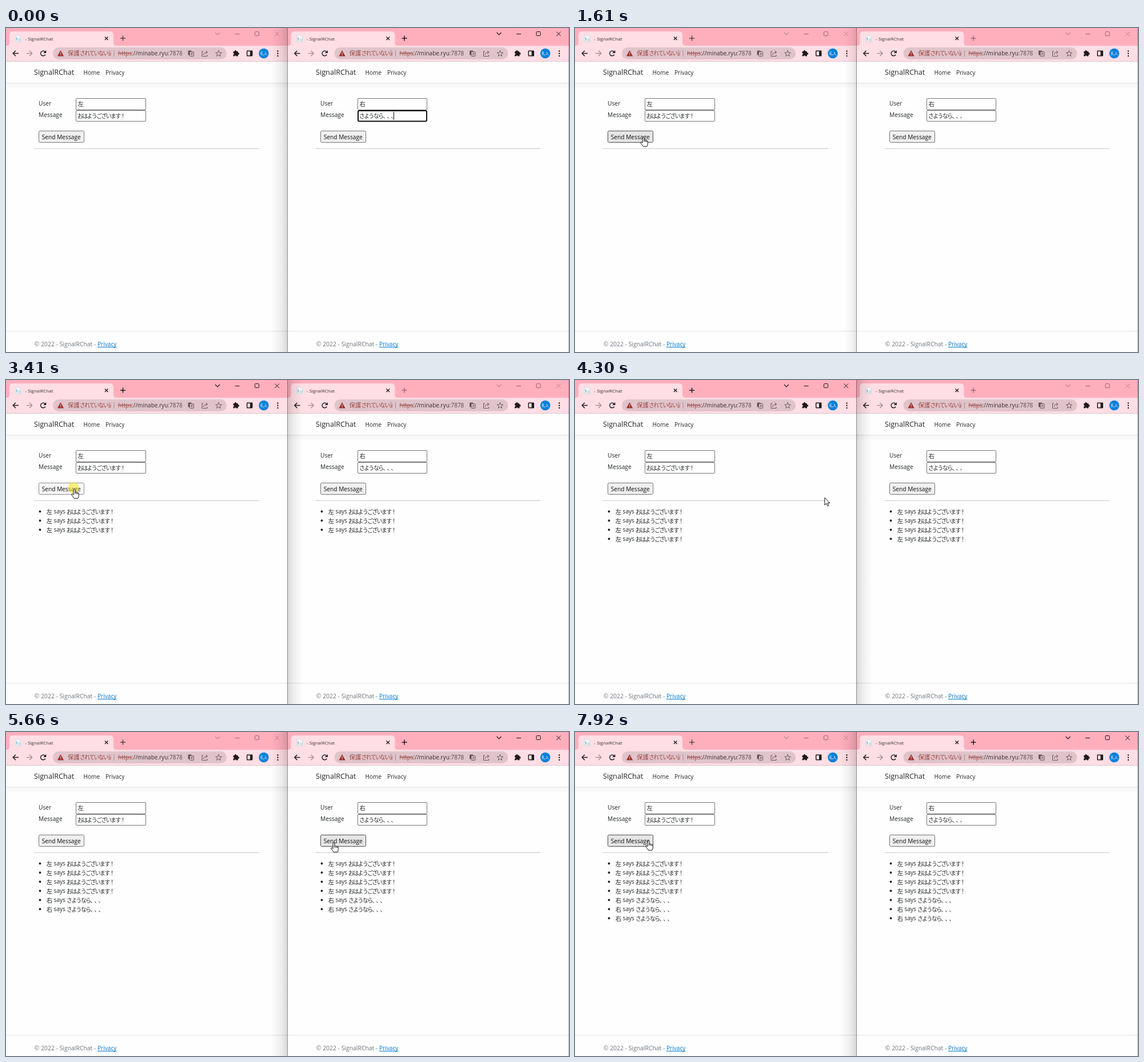
Write an HTML page with a canvas that moves like this. It is 985x568 px and loops after 7.99 s.

```html
<!DOCTYPE html>
<html lang="ja">
<head>
<meta charset="utf-8">
<title>SignalRChat</title>
<style>
html, body { margin: 0; width: 100%; height: 100%; overflow: hidden; background: #fff; }
canvas { display: block; }
</style>
</head>
<body>
<canvas id="stage" width="985" height="568"></canvas>
<script>
const ctx = document.getElementById('stage').getContext('2d');
const LOOP = 7990, TICK = 70;
const FONT = '"Open Sans", "Noto Sans", "Noto Sans CJK JP", sans-serif';
const JP = '"Noto Sans CJK JP", "Noto Sans CJK", sans-serif';
const INK = '#212529';

// Pointer path: time, x, y
const PATH = [
  [840, 433, 529], [1120, 300, 370], [1400, 160, 238], [1610, 119.5, 190.5],
  [3889, 119.5, 190.5], [3890, 135, 195], [4300, 433.5, 206.5], [4650, 551, 202],
  [4720, 553, 198], [4860, 573.5, 193.5], [6729, 573.5, 193.5], [6730, 567.5, 194.5],
  [7010, 420, 213], [7290, 255, 207], [7500, 194, 196], [7710, 150, 192], [7920, 128.5, 190]
];
const MOVES = [[840, 1610], [3890, 4860], [6730, 7920]];

// Clicks: press, message appears, highlight ends, side
const CLICKS = [
  [1880, 1950, 2010, 0], [2270, 2340, 2410, 0], [2740, 2810, 2810, 0], [3410, 3480, 3480, 0],
  [5060, 5190, 5190, 1], [5590, 5660, 5660, 1], [6060, 6130, 6130, 1]
];

function rect(x, y, w, h, color) {
  ctx.fillStyle = color;
  ctx.fillRect(x, y, w, h);
}

function line(pts, color, w = 1, close = false) {
  ctx.beginPath();
  pts.forEach(([x, y]) => ctx.lineTo(x, y));
  if (close) ctx.closePath();
  ctx.strokeStyle = color;
  ctx.lineWidth = w;
  ctx.stroke();
}

function poly(pts, color) {
  ctx.beginPath();
  pts.forEach(([x, y]) => ctx.lineTo(x, y));
  ctx.fillStyle = color;
  ctx.fill();
}

function disc(x, y, r, color) {
  ctx.beginPath();
  ctx.arc(x, y, r, 0, 7);
  ctx.fillStyle = color;
  ctx.fill();
}

function box(x, y, w, h, r, fill, stroke, lw = 1) {
  ctx.beginPath();
  ctx.roundRect(x, y, w, h, r);
  if (fill) { ctx.fillStyle = fill; ctx.fill(); }
  if (stroke) { ctx.strokeStyle = stroke; ctx.lineWidth = lw; ctx.stroke(); }
}

function text(str, x, y, size, color = INK) {
  ctx.font = `${size}px ${FONT}`;
  ctx.fillStyle = color;
  ctx.fillText(str, x, y);
  return x + ctx.measureText(str).width;
}

// Japanese text on an even pitch, free of contextual spacing
function kana(str, x, y, pitch, color = INK, size = 9.7) {
  ctx.font = `${size}px ${JP}`;
  ctx.fillStyle = color;
  [...str].forEach((ch, i) => ctx.fillText(ch, x + i * pitch, y));
}

function phrase(side, x, y) {
  if (side) {
    kana('さようなら', x, y, 8.3);
    kana('、、、', x + 41.5, y, 7);
  } else {
    kana('おはようございます！', x, y, 8.3);
  }
}

function tabStrip(side, active) {
  const tint = '#ffdee5';
  rect(0, 0, 493, 31, '#ffaebc');
  ctx.beginPath();
  ctx.moveTo(1, 31);
  ctx.quadraticCurveTo(6, 31, 6, 26);
  ctx.lineTo(6, 12);
  ctx.quadraticCurveTo(6, 6, 12, 6);
  ctx.lineTo(182, 6);
  ctx.quadraticCurveTo(188, 6, 188, 12);
  ctx.lineTo(188, 26);
  ctx.quadraticCurveTo(188, 31, 193, 31);
  ctx.fillStyle = tint;
  ctx.fill();
  rect(0, 31, 493, 27, tint);
  rect(0, 58, 493, 1, '#dfc3ca');

  poly([[16.5, 13], [23, 13], [26, 16], [26, 24], [16.5, 24]], '#f7fafb');
  line([[16.5, 13], [23, 13], [26, 16], [26, 24], [16.5, 24]], '#c3cdd4', .8, true);
  rect(18, 16, 1.5, 6, '#7fb4d2');
  rect(21, 18, 5, 5, '#c9e2ee');
  text('- SignalRChat', 33.5, 22, 8, '#3d3035');
  line([[173, 15.5], [178.5, 21]], '#2b2024', 1.4);
  line([[178.5, 15.5], [173, 21]], '#2b2024', 1.4);

  const plus = active ? '#151515' : side ? '#9a6872' : '#574046';
  line([[200, 18], [209, 18]], plus, 1.4);
  line([[204.5, 13.5], [204.5, 22.5]], plus, 1.4);

  const ink = active ? '#1c1518' : '#98646f', soft = active ? ink : '#c08491';
  line([[366, 8], [370, 12], [374, 8]], soft, 1.1);
  line([[400.5, 10.5], [408.5, 10.5]], ink, 1);
  box(435.5, 6.5, 7, 7, 1, null, ink);
  line([[470.5, 6.5], [478, 14]], soft, 1);
  line([[478, 6.5], [470.5, 14]], soft, 1);
}

function toolbar() {
  const dark = '#20191c', mid = '#6b565c';
  line([[22, 44.5], [12.5, 44.5]], dark, 1.5);
  line([[17, 39.8], [12.3, 44.5], [17, 49.2]], dark, 1.5);
  line([[36, 44.5], [45.5, 44.5]], '#a48b92', 1.3);
  line([[41, 39.8], [45.7, 44.5], [41, 49.2]], '#a48b92', 1.3);
  ctx.beginPath();
  ctx.arc(65, 44.5, 4.3, .5, 5.5);
  ctx.strokeStyle = dark;
  ctx.lineWidth = 1.5;
  ctx.stroke();
  poly([[70.3, 39], [70.3, 44], [65.3, 44]], dark);

  const pill = '#e0c4cb';
  box(82, 34, 304, 21, 10.5, pill);
  poly([[95.5, 39], [101.2, 49.5], [89.8, 49.5]], '#a2302b');
  rect(95, 42.5, 1.1, 3.4, pill);
  rect(95, 46.8, 1.1, 1.2, pill);

  ctx.save();
  ctx.beginPath();
  ctx.rect(106, 36, 77.5, 18);
  ctx.clip();
  const warn = '#a0453f';
  kana('保護', 108, 48.2, 10.4, warn, 10.4);
  kana('されていない', 129, 48.2, 8.2, warn);
  kana('通', 179, 48.2, 10.4, warn, 10.4);
  ctx.restore();
  rect(188.5, 39, 1, 11, '#a98a92');

  const end = text('https', 196, 48, 10, '#9c4a44');
  rect(196, 44, end - 196, 1, '#9c4a44');
  const port = text('://minabe.ryu', end, 48, 10, '#3a2e32');
  text(':7878', port, 48, 10, '#584a4f');

  box(318.5, 39.5, 6, 8, 1, mid, null);
  box(321.5, 41.5, 7, 8, 1, pill, mid);
  line([[323, 44], [327, 44]], mid, .8);
  line([[326.5, 44], [323.5, 48]], mid, .8);
  line([[324, 45], [327, 48]], mid, .8);

  line([[345.5, 41], [343, 41], [343, 49.5], [352, 49.5], [352, 47]], mid, 1);
  ctx.beginPath();
  ctx.moveTo(345.5, 47);
  ctx.quadraticCurveTo(346, 42.5, 352, 42.5);
  ctx.stroke();
  line([[349.5, 39.7], [352.6, 42.5], [349.5, 45.3]], mid, 1);

  const star = Array.from({ length: 10 }, (_, i) => {
    const a = i * Math.PI / 5 - Math.PI / 2, r = i % 2 ? 2.4 : 5.6;
    return [372 + r * Math.cos(a), 45 + r * Math.sin(a)];
  });
  line(star, mid, 1, true);

  box(397.5, 41, 8.5, 8.5, 1, dark);
  disc(401.5, 40.7, 1.8, dark);
  disc(406.3, 45, 1.8, dark);
  disc(397.5, 45.3, 1.4, '#ffdee5');
  disc(401.5, 49.6, 1.4, '#ffdee5');

  box(421.7, 40.2, 9, 8.6, .5, null, dark, 1.5);
  rect(427, 40, 4, 9, dark);

  disc(451, 44.5, 8.7, '#0b80d7');
  kana('礼人', 444.5, 47.1, 6.5, '#fff', 6.5);
  [40.5, 44.7, 48.9].forEach(y => disc(475.5, y, 1.2, dark));
}

function page(side, s) {
  rect(0, 59, 493, 509, '#fefefe');
  const g = ctx.createLinearGradient(0, 97, 0, 107);
  g.addColorStop(0, 'rgba(0,0,0,.035)');
  g.addColorStop(1, 'rgba(0,0,0,0)');
  rect(0, 97, 493, 10, g);
  rect(0, 96, 493, 1, '#dfe2e5');
  text('SignalRChat', 49, 82, 12.7);
  text('Home', 135.5, 82, 10.1);
  text('Privacy', 174, 82, 10.1);

  // The right half is a fraction narrower once snapped to pixels
  const field = 122 - side;
  text('User', 57, 136, 10.2);
  text('Message', 57, 156.4, 10.2);
  box(122.5, 123.5, field, 20, 1.5, '#fff', '#767676');
  kana(side ? '右' : '左', 125.5, 137.3, 10.4, INK, 10.4);
  if (s.focus) box(123, 145, field - 1, 18.5, 2, '#fff', '#101010', 2);
  else box(122.5, 144.5, field, 19, 1.5, '#fff', '#767676');
  phrase(side, 125, 157.8);
  if (s.focus) rect(185, 147, 1, 14, '#000');

  const [fill, edge] = s.press ? ['#f5f5f5', '#8d8d8d'] : s.hover ? ['#e5e5e5', '#4f4f4f'] : ['#efefef', '#767676'];
  box(57.5, 180.5, 79, 20, 2, fill, edge);
  text('Send Message', 62.7, 194.7, 10.2, '#111');
  rect(49, 211, 394 - side, 1, '#c9c9ca');

  s.rows.forEach((from, i) => {
    const y = 234.3 + i * 16;
    disc(59.5, y - 3.8, 1.9, INK);
    kana(from ? '右' : '左', 70.7, y + .2, 10.4, INK, 10.4);
    text('says', 83.6, y, 10.1);
    phrase(from, 106, y + .2);
  });

  rect(0, 531, 493, 1, '#dfe2e5');
  const x = text('© 2022 - SignalRChat - ', 49.8, 558, 10.4, '#6c757d');
  const end = text('Privacy', x, 558, 10.1, '#0077cc');
  rect(x, 559, end - x, 1, '#0077cc');
}

function browser(side, s) {
  ctx.save();
  ctx.beginPath();
  ctx.rect(side * 492, 0, 493, 568);
  ctx.clip();
  ctx.translate(side * 493, 0);
  page(side, s);
  ctx.translate(side * -.5, 0);
  tabStrip(side, s.active);
  toolbar();
  ctx.restore();
}

function shade(x0, x1, alpha) {
  const g = ctx.createLinearGradient(x0, 0, x1, 0);
  g.addColorStop(0, `rgba(0,0,0,${alpha})`);
  g.addColorStop(.4, `rgba(0,0,0,${alpha * .42})`);
  g.addColorStop(1, 'rgba(0,0,0,0)');
  rect(Math.min(x0, x1), 0, Math.abs(x1 - x0), 568, g);
}

function pointerAt(t) {
  if (t < PATH[0][0]) return null;
  const move = MOVES.find(([a, b]) => t >= a && t < b);
  if (move) t = Math.min(move[1], move[0] + Math.floor((t - move[0]) / TICK + .2) * TICK);
  const i = PATH.findIndex(k => k[0] > t);
  if (i < 0) return PATH[PATH.length - 1].slice(1);
  const [t0, x0, y0] = PATH[i - 1], [t1, x1, y1] = PATH[i];
  const f = (t - t0) / (t1 - t0);
  return [x0 + (x1 - x0) * f, y0 + (y1 - y0) * f];
}

const ARROW = new Path2D('M0 0V12.8L3 10.1L5 14.6L7 13.7L5.1 9.3H9Z');
const HAND = new Path2D('M-1.4 10.8V1.2Q0-.8 1.4 1.2V6.2Q2.8 5.2 3.8 6.9Q5.2 5.9 6 7.5Q7.7 6.8 7.8 8.8V12Q7.8 14.6 6.4 17.2H-.2Q-1.5 14.8-4.6 11.3Q-5.3 9.4-3.5 9.3Z');
const FINGERS = new Path2D('M1.4 6V9.2M3.8 7V9.4M6 7.6V9.6');

function pointer(x, y, hand) {
  ctx.save();
  ctx.translate(x, y);
  const shape = hand ? HAND : ARROW;
  ctx.fillStyle = '#fff';
  ctx.strokeStyle = '#111';
  ctx.lineWidth = 1;
  ctx.lineJoin = 'round';
  ctx.fill(shape);
  ctx.stroke(shape);
  if (hand) ctx.stroke(FINGERS);
  ctx.restore();
}

function draw(t) {
  const focus = t < 180 || t >= 5060 ? 1 : t >= 1880 ? 0 : -1;
  const rows = CLICKS.filter(c => t >= c[1]).map(c => c[3]);
  const click = CLICKS.find(c => t >= c[0] && t < c[2]);
  const pos = pointerAt(t);
  const over = pos && pos[1] >= 180 && pos[1] <= 201
    ? [57, 550].findIndex(x => pos[0] >= x && pos[0] <= x + 80) : -1;

  for (const side of [0, 1]) {
    browser(side, {
      rows,
      active: focus === side,
      focus: side === 1 && t < 180,
      hover: over === side,
      press: click && click[3] === side && t < click[1]
    });
  }
  if (focus === 0) shade(493, 519, .15);
  else if (focus === 1) shade(492, 464, .15);
  else shade(492, 472, t < 250 ? .13 : .1);
  rect(492, 0, 1, 568, 'rgba(80,65,70,.62)');
  rect(984, 0, 1, 568, 'rgba(80,65,70,.4)');

  if (click) disc(pos[0] - 1.5, pos[1] - 1.5, 9.7, 'rgba(250,232,20,.52)');
  if (pos) pointer(pos[0], pos[1], over >= 0);
}

function frame() {
  draw(performance.now() % LOOP);
  requestAnimationFrame(frame);
}
frame();
</script>
</body>
</html>
```
